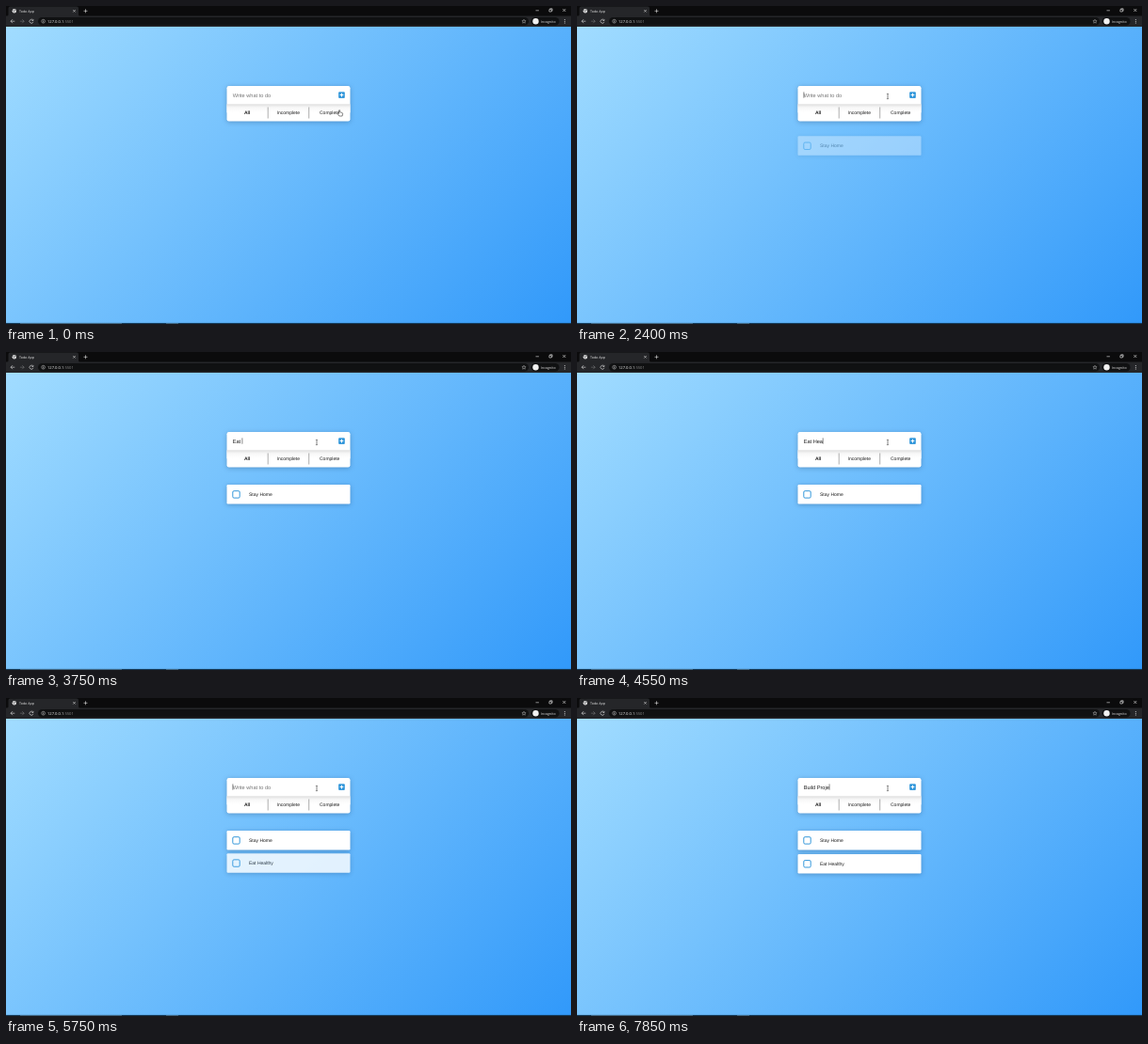
An HTML page for the animation above (8 s loop, 600 px wide and 338 px high).

```html
<!DOCTYPE html>
<html lang="en">
<head>
<meta charset="utf-8">
<title>Todo App</title>
<style>
  html, body { margin: 0; width: 100%; height: 100%; overflow: hidden; background: #5cb3fc; }
  svg { display: block; width: 100vw; height: 100vh; }
  text { font-family: "Liberation Sans", Arial, sans-serif; font-size: 5px; fill: #1c1c1c;
         white-space: pre; text-rendering: geometricPrecision; }
  .ui text { font-family: "Open Sans", "Noto Sans", sans-serif; font-size: 3.6px; fill: #eee; }
  .ui .line { fill: none; stroke: #e4e4e4; stroke-width: .6; }
  .tabs text { text-anchor: middle; }
  .soft { filter: drop-shadow(0 1.2px 2.4px rgba(0, 30, 70, .28)); }
</style>
</head>
<body>
<svg viewBox="0 0 600 338" preserveAspectRatio="none">
  <defs>
    <linearGradient id="sky" gradientUnits="userSpaceOnUse" x1="71" y1="-49" x2="529" y2="409">
      <stop offset="0" stop-color="#a1dcff"/>
      <stop offset="1" stop-color="#3199fa"/>
    </linearGradient>
    <linearGradient id="fold" x1="0" y1="0" x2="0" y2="1">
      <stop offset="0" stop-color="#dedede"/>
      <stop offset=".4" stop-color="#f8f8f8"/>
      <stop offset="1" stop-color="#fff"/>
    </linearGradient>
  </defs>

  <rect y="22" width="600" height="316" fill="url(#sky)"/>

  <g class="ui">
    <rect width="600" height="22" fill="#0b0b0c"/>
    <path d="M0 10.5H1Q2.5 10.5 2.5 9V2.500Q2.500 .5 4.500 .5H75Q77 .5 77 2.500V9Q77 10.500 78.500 10.500H600V22H0Z" fill="#252629"/>
    <rect x="34" y="12" width="521" height="8.600" rx="4.300" fill="#101112"/>
    <circle cx="8.8" cy="5.300" r="2.200" fill="#e8e8e8"/>
    <path d="M7.200 4.500L8.600 5.300L8.300 6.700M9 3.500L9.300 4.600L10.600 4.900" fill="none" stroke="#35363a" stroke-width=".6"/>
    <text x="14" y="6.600">Todo App</text>
    <path class="line" d="M71.300 4.100l2.400 2.400m0-2.400l-2.400 2.400M82.500 5.300h4m-2-2v4M562.500 4.800h3.400M591.300 3l3 3m0-3l-3 3"/>
    <path class="line" d="M576.900 3.600h2.400v2.400h-2.400zM577.700 3.600v-.8h2.400v2.400h-.8"/>
    <path class="line" d="M9.300 16.200H5m2-2l-2 2l2 2"/>
    <path class="line" d="M14.900 16.200h4.300m-2-2l2 2l-2 2" opacity=".4"/>
    <path class="line" d="M28.700 15.200A2 2 0 1 0 28.900 16.800M28.900 13.900V15.500H27.300"/>
    <circle class="line" cx="39.600" cy="16.200" r="1.900" style="stroke-width:.45"/>
    <path class="line" d="M39.600 15.800v1.500M39.600 14.900v.5"/>
    <text x="44" y="17.800" style="font-size:4.100px">127.0.0.1<tspan fill="#888">:5501</tspan></text>
    <path class="line" style="stroke-width:.4" d="M550 14.200l.6 1.400l1.500.1l-1.200 1l.4 1.500l-1.300-.8l-1.300.8l.4-1.500l-1.200-1l1.500-.1z"/>
    <rect x="557.500" y="12" width="30" height="8.600" rx="4.300" fill="#101112"/>
    <circle cx="562.500" cy="16.300" r="3.200" fill="#f1f1f1"/>
    <text x="568" y="17.600">Incognito</text>
    <g fill="#e4e4e4">
      <circle cx="593.300" cy="14.500" r=".5"/><circle cx="593.300" cy="16.300" r=".5"/><circle cx="593.300" cy="18.100" r=".5"/>
    </g>
  </g>
  <rect y="336.900" width="600" height="1.100" fill="#12344f"/>
  <path d="M15 337.500H123M170 337.500H183" stroke="#49708c" stroke-width=".8"/>

  <g class="soft">
    <rect x="234.500" y="85" width="131" height="37.500" rx="2.200" fill="#fff"/>
  </g>
  <rect x="234.500" y="104.300" width="131" height="9" fill="url(#fold)"/>
  <path d="M278.200 107.500V119.500M321.700 107.500V119.500" stroke="#777" stroke-width=".6"/>
  <g class="tabs">
    <text x="256.200" y="114.800" font-weight="bold">All</text>
    <text x="299.800" y="114.800">Incomplete</text>
    <text x="343.700" y="114.800">Complete</text>
  </g>
  <rect x="353.100" y="91.200" width="6.700" height="6.700" rx="1" fill="#3498db"/>
  <path d="M354.600 94.550h3.700m-1.850-1.850v3.700" stroke="#fff" stroke-width="1.100"/>

  <text id="field" x="240.700" y="96.500" style="font-size:5.625px"></text>
  <path id="caret" d="M0 91.400V97.700" stroke="#111" stroke-width=".5"/>
  <g id="list"></g>

  <path id="hand" d="M-1.300-2.600Q-.7-3.400-.1-2.600V-.5L2-.1Q2.900.1 2.800 1.100L2.300 3.500H-.9L-2.600 1.200Q-2.800.2-1.900.4L-1.300.9Z"
        fill="#fff" stroke="#111" stroke-width=".5"/>
  <path id="beam" d="M-1.100-2.600H-.3L0-2.300L.3-2.600H1.100M0-2.300V2.300M-1.100 2.600H-.3L0 2.300L.3 2.600H1.100"
        fill="none" stroke="#222" stroke-width=".55"/>
</svg>

<script>
  const LOOP = 8000, FOCUS = 850, DROP = 500, HINT = "Write what to do";
  const $ = id => document.getElementById(id);
  const field = $("field"), caret = $("caret"), hand = $("hand"), beam = $("beam");

  // Each entry: the words, the time of each key press, the time of Enter.
  const entries = [
    { words: "Stay Home", keys: [950, 1150, 1250, 1300, 1400, 1650, 1950, 2050, 2100], enter: 2250 },
    { words: "Eat Healthy", keys: [3350, 3550, 3650, 3750, 4000, 4200, 4500, 4850, 4900, 5050, 5100], enter: 5450 },
    { words: "Build Proje", keys: [6100, 6200, 6400, 6600, 6800, 6850, 7150, 7250, 7400, 7700, 7850], enter: LOOP }
  ];

  const items = entries.slice(0, 2).map((entry, i) => {
    const g = document.createElementNS("http://www.w3.org/2000/svg", "g");
    g.innerHTML = `<rect class="soft" x="234.5" y="141" width="131" height="20.500" rx="1.200" fill="#fff"/>
      <rect x="240.800" y="147.700" width="7.400" height="7.400" rx="1.300" fill="none" stroke="#3498db" stroke-width="1"/>
      <text x="258" y="153.100">${entry.words}</text>`;
    $("list").append(g);
    return { g, y: i * 24.9, enter: entry.enter };
  });

  const clamp = x => Math.min(1, Math.max(0, x));

  // cubic-bezier(.42, 0, .58, 1), solved by bisection
  function easeInOut(x) {
    let lo = 0, hi = 1;
    for (let i = 0; i < 20; i++) {
      const s = (lo + hi) / 2, r = 1 - s;
      if (3 * r * r * s * .42 + 3 * r * s * s * .58 + s ** 3 < x) lo = s; else hi = s;
    }
    return lo * lo * (3 - 2 * lo);
  }

  function typedAt(t) {
    const { words, keys } = entries.find(e => t < e.enter);
    return words.slice(0, keys.filter(k => k <= t).length);
  }

  function showField(t) {
    const typed = typedAt(t);
    field.textContent = typed || HINT;
    field.style.fill = typed ? "#1c1c1c" : "#757575";
    const x = 240.7 + (typed ? field.getComputedTextLength() : 0);
    caret.setAttribute("transform", `translate(${x + .2} 0)`);
    caret.style.display = t < FOCUS ? "none" : "";
  }

  function showItem({ g, y, enter }, t) {
    const p = easeInOut(clamp((t - enter + 50) / DROP));
    g.style.display = t < enter ? "none" : "";
    g.setAttribute("opacity", p);
    g.setAttribute("transform", `translate(0 ${y - 4 * (1 - p)})`);
  }

  function showPointer(t) {
    const p = easeInOut(clamp((t - 20) / 330));
    const x = 354.8 - 24.8 * p, y = 113.5 - 17.5 * p;
    const overField = y < 104;
    for (const shape of [hand, beam]) shape.setAttribute("transform", `translate(${x} ${y})`);
    hand.style.display = overField ? "none" : "";
    beam.style.display = overField ? "" : "none";
  }

  function draw(t) {
    showField(t);
    items.forEach(item => showItem(item, t));
    showPointer(t);
  }

  const start = performance.now();
  function tick() {
    draw((performance.now() - start) % LOOP);
    requestAnimationFrame(tick);
  }
  tick();
</script>
</body>
</html>
```
